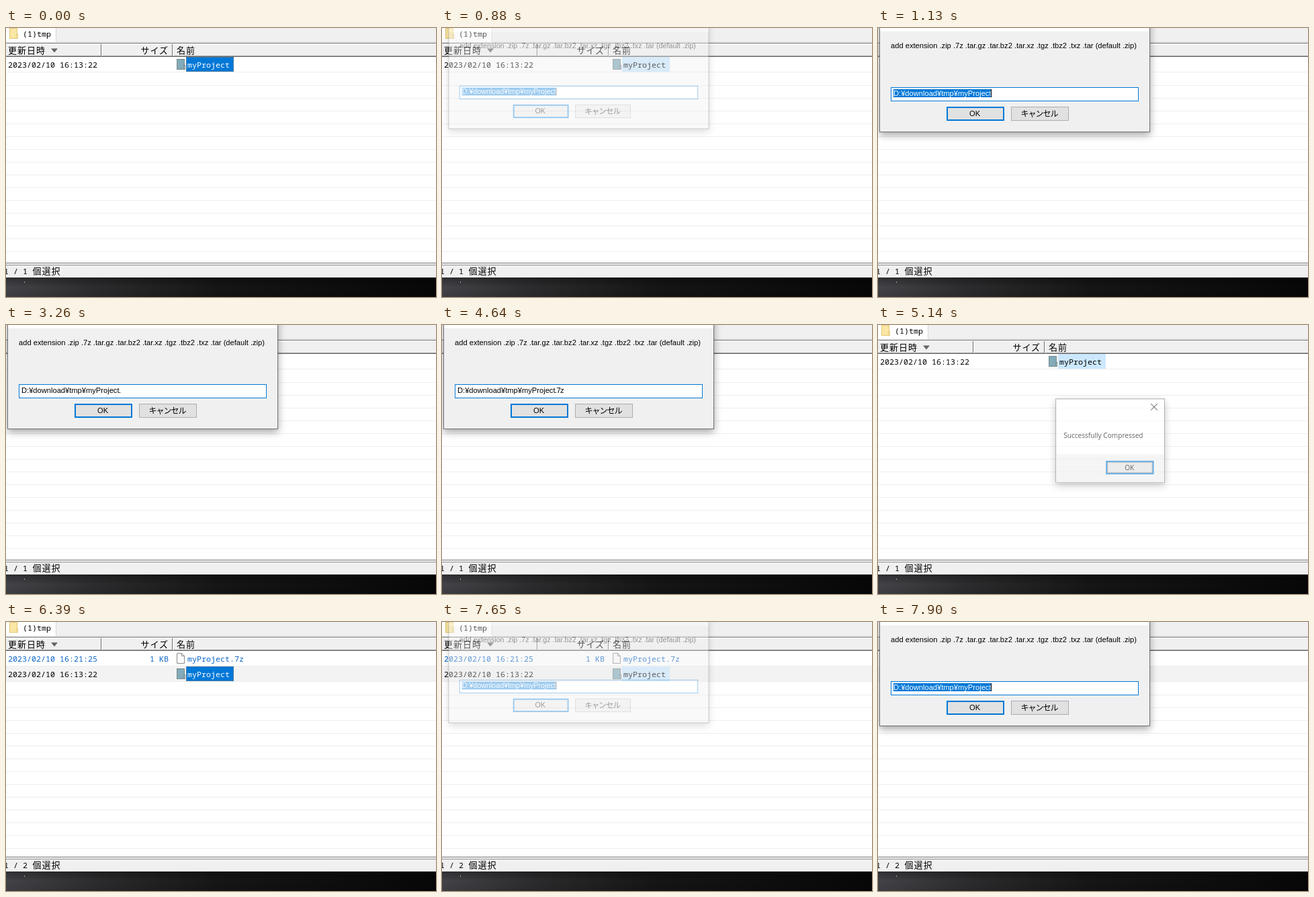
Recreate the animation shown at these times as an HTML page. Size 640 by 400 pixels, loop 8 s.

```html
<!DOCTYPE html>
<html lang="ja">
<head>
<meta charset="utf-8">
<title>Compress a folder</title>
<style>
html, body { margin: 0; width: 100%; height: 100%; overflow: hidden; background: #fff; }
svg { display: block; width: 640px; height: 400px; }
text { white-space: pre; }
.mono { font: 11.67px "Noto Sans Mono", "DejaVu Sans Mono", monospace; }
.jp { font: 13px "Noto Sans CJK JP", "Noto Sans CJK", sans-serif; letter-spacing: 1px; }
.ui { font: 11.15px "Liberation Sans", Arial, sans-serif; }
.kana { font: 12px "Noto Sans CJK JP", "Noto Sans CJK", sans-serif; letter-spacing: -1px; }
.msg { font: 10.5px "Open Sans", "Noto Sans", sans-serif; }
.shadow { filter: drop-shadow(0 4px 6px rgba(0, 0, 0, .36)); }
</style>
</head>
<body>
<svg id="stage" viewBox="0 0 640 400">
  <defs>
    <linearGradient id="night">
      <stop offset="0" stop-color="#444348"/>
      <stop offset=".2" stop-color="#2d2c2e"/>
      <stop offset=".5" stop-color="#151515"/>
      <stop offset="1" stop-color="#070707"/>
    </linearGradient>
    <linearGradient id="dusk" x2="0" y2="1">
      <stop offset="0" stop-color="#000" stop-opacity=".3"/>
      <stop offset=".5" stop-color="#000" stop-opacity="0"/>
      <stop offset="1" stop-color="#000" stop-opacity=".1"/>
    </linearGradient>
  </defs>
</svg>
<script>
const BLUE = '#0078d7';
const stage = document.getElementById('stage');

const rect = (x, y, w, h, fill, more = '') =>
  `<rect x="${x}" y="${y}" width="${w}" height="${h}" fill="${fill}" ${more}/>`;
const frame = (x, y, w, h, fill, line, t = 1) =>
  rect(x + t / 2, y + t / 2, w - t, h - t, fill, `stroke="${line}" stroke-width="${t}"`);
const text = (x, y, cls, s, fill = '#000', more = '') =>
  `<text x="${x}" y="${y}" class="${cls}" fill="${fill}" ${more}>${s}</text>`;
const path = (d, fill, line = 'none', more = '') =>
  `<path d="${d}" fill="${fill}" stroke="${line}" ${more}/>`;
const group = (id, body, more = '') => `<g id="${id}" ${more}>${body}</g>`;

const folder = (x, y, fill, line, tab) =>
  frame(x, y, 12, 16, fill, line) + frame(x + 10, y + 9, 3, 7, tab, line);

function rowLines(first, from) {
  let out = rect(0, first, 640, 1, '#eee');
  for (let y = from; y < 349; y += 19) out += rect(0, y, 640, 1, '#eee');
  return out;
}

// The folder row, with its focused and unfocused highlight
function folderRow(y) {
  return text(3, y + 16, 'mono', '2023/02/10 16:13:22') +
    folder(254, y + 3, '#82abb9', '#75898f', '#a9bcc0') +
    `<g class="active">${rect(268, y, 71, 22, BLUE)}` +
    rect(268.5, y + .5, 70, 21, 'none', 'stroke="#ff8728" stroke-opacity=".55" stroke-dasharray="1 1"') +
    text(270, y + 16, 'mono', 'myProject', '#fff') + '</g>' +
    `<g class="idle">${rect(268, y, 71, 22, '#cce8ff')}` +
    text(270, y + 16, 'mono', 'myProject') + '</g>';
}

const status = n => text(-3, 366, 'mono', `1 / ${n}`) + text(39.5, 366, 'jp', '個選択');

const divider = x => rect(x, 24, 1, 18, '#6d6d6d') + rect(x + 1, 24, 1, 18, '#fff');

const chrome =
  rect(0, 0, 640, 400, '#fff') +
  rect(0, 0, 640, 22, '#f0f0f0') + rect(0, 20, 640, 1, '#e2e2e2') +
  rect(0, 0, 74, 21, '#fff') + rect(74, 0, 1, 21, '#d5d5d5') +
  folder(5, 0, '#fae7a5', '#e3c877', '#fff0bd') +
  text(25, 13, 'mono', '(1)tmp') +
  rect(0, 22, 640, 1, '#777') + rect(0, 23, 640, 19, '#f0f0f0') +
  rect(0, 24, 640, 1, '#fff') + rect(0, 41, 640, 1, '#a0a0a0') + rect(0, 42, 640, 1, '#696969') +
  text(3, 38, 'jp', '更新日時') + path('M67 30.5h10l-5 6z', '#646464') +
  text(200.5, 38, 'jp', 'サイズ') + text(254, 38, 'jp', '名前') +
  divider(141) + divider(247);

const footer =
  rect(0, 349, 640, 22, '#f0f0f0') + rect(0, 349, 640, 1, '#777') +
  rect(0, 350, 640, 2, '#f7f7f7') + rect(0, 352, 640, 1, '#8a8a8a') +
  rect(0, 371, 640, 29, 'url(#night)') + rect(0, 371, 640, 29, 'url(#dusk)') +
  rect(27, 377, 1, 2, '#a5a5a5');

const before = rowLines(65, 85) + folderRow(43) + status(1);

const LINK = '#0a64c8';
const after = rect(0, 66, 640, 22, '#f3f3f3') + rowLines(65, 108) + rect(0, 88, 640, 1, '#eee') +
  text(3, 59, 'mono', '2023/02/10 16:21:25', LINK) + text(214, 59, 'mono', '1 KB', LINK) +
  path('M254.5 46.5h7l4 4v11h-11zM261.5 46.5v4h4', '#fafafa', '#8c8c8c') +
  text(270, 59, 'mono', 'myProject.7z', LINK) + folderRow(66) + status(2);

const consoleWin =
  rect(-20, -20, 578, 336, '#000') + rect(541, -20, 17, 336, '#f0f0f0') +
  path('M558.5 -20V316.5H-20', 'none', '#777') +
  path('M546 306.5l3.5 3.5 3.5-3.5', 'none', '#404040', 'stroke-width="1.8"');

const FILE = 'D:¥download¥tmp¥myProject';
const dialog =
  `<g class="shadow">${frame(2, -40, 403, 195, '#f0f0f0', '#6f6f6f')}</g>` +
  rect(3, -39, 401, 44, '#fff') +
  text(19, 30, 'ui', 'add extension .zip .7z .tar.gz .tar.bz2 .tar.xz .tgz .tbz2 .txz .tar (default .zip)') +
  frame(19, 88, 369, 21, '#fff', BLUE) +
  group('mark', rect(23, 91, 145, 12, BLUE)) +
  text(23, 101, 'ui', FILE, '#000', 'id="name"') +
  text(168, 101, 'ui', '', '#000', 'id="typed" letter-spacing="-.6"') +
  rect(168, 91, 1, 12, '#000', 'id="caret"') +
  frame(102, 117, 86, 21, '#e1e1e1', BLUE, 2) + text(136, 131, 'ui', 'OK') +
  frame(198, 117, 86, 21, '#e1e1e1', '#adadad') + text(212.5, 131.5, 'kana', 'キャンセル');

const message =
  `<g class="shadow">${frame(261, 107, 169, 130, '#fff', '#777')}</g>` +
  rect(262, 193, 167, 43, '#f0f0f0') +
  path('M408.5 115l10 10m0-10l-10 10', 'none', '#222', 'stroke-width="1.1"') +
  text(273.5, 167.5, 'msg', 'Successfully Compressed') +
  frame(339, 203, 74, 21, '#e1e1e1', BLUE, 2) +
  rect(341.5, 205.5, 69, 16, 'none', 'stroke="#444" stroke-dasharray="1 1"') +
  text(368, 217.5, 'msg', 'OK');

stage.insertAdjacentHTML('beforeend', chrome + footer +
  group('before', before) + group('after', after) +
  group('console', consoleWin) + group('dialog', dialog) + group('message', message));

const el = id => document.getElementById(id);
const show = (node, on) => { node.style.display = on ? '' : 'none'; };

// A window fades and zooms about its centre
function pose(id, [alpha, zoom], cx, cy) {
  const g = el(id);
  show(g, alpha > 0);
  g.setAttribute('opacity', alpha);
  g.setAttribute('transform', `translate(${cx} ${cy}) scale(${zoom}) translate(${-cx} ${-cy})`);
}

const GONE = [0, 1], FULL = [1, 1], FAINT = [.38, .963], NEAR = [.9, .992];
const START = {
  rows: 1, active: true, dialog: GONE, message: GONE, console: 0,
  marked: true, typed: '', caret: 168
};

// Each step changes only what it names; caret 0 means hidden
const STEPS = [
  [0, {}],
  [880, { active: false, dialog: FAINT }],
  [1000, { dialog: NEAR }],
  [1130, { dialog: FULL }],
  [1380, { caret: 0 }],
  [1750, { marked: false, caret: 168 }],
  [2250, { caret: 0 }],
  [2760, { typed: '.', caret: 170 }],
  [3260, { caret: 0 }],
  [3760, { caret: 170 }],
  [4010, { typed: '.7', caret: 176 }],
  [4120, { typed: '.7z', caret: 181 }],
  [4640, { caret: 0 }],
  [5010, { dialog: FAINT, console: .28 }],
  [5140, { dialog: GONE, console: 0, message: [.6, .963] }],
  [5260, { message: NEAR }],
  [5390, { message: FULL }],
  [6270, { message: FAINT, active: true }],
  [6390, { message: GONE, rows: 2 }],
  [7650, { active: false, dialog: FAINT, marked: true, typed: '', caret: 168 }],
  [7780, { dialog: NEAR }],
  [7900, { dialog: FULL }]
];

let last = START;
const states = STEPS.map(([at, change]) => ({ at, s: last = { ...last, ...change } }));

function draw(s) {
  show(el('before'), s.rows === 1);
  show(el('after'), s.rows === 2);
  document.querySelectorAll('.active').forEach(n => show(n, s.active));
  document.querySelectorAll('.idle').forEach(n => show(n, !s.active));
  pose('console', [s.console, 1], 0, 0);
  pose('dialog', s.dialog, 203.5, 30);
  pose('message', s.message, 345.5, 172);
  show(el('mark'), s.marked);
  el('name').setAttribute('fill', s.marked ? '#fff' : '#000');
  el('typed').textContent = s.typed;
  show(el('caret'), s.caret);
  el('caret').setAttribute('x', s.caret);
}

const LOOP = 8000;
const begin = performance.now();
let current = null;
function tick() {
  const t = (performance.now() - begin) % LOOP;
  const next = states.filter(k => k.at <= t).pop() || states[0];
  if (next !== current) draw((current = next).s);
  requestAnimationFrame(tick);
}
tick();
</script>
</body>
</html>
```
